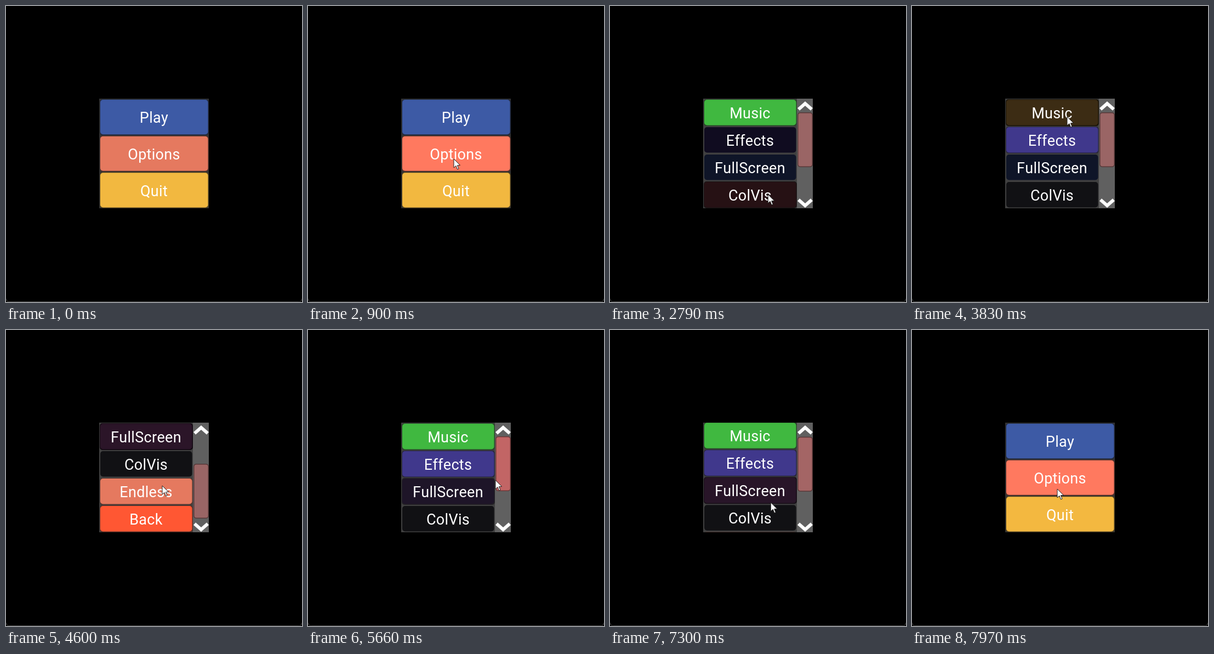
Animation, 540 px wide and 540 px high, one loop 7990 ms. Source, as an HTML page with a canvas:

```html
<!DOCTYPE html>
<html lang="en">
<head>
<meta charset="utf-8">
<title>Game menu</title>
<style>
  html, body { margin: 0; width: 100%; height: 100%; overflow: hidden; background: #000; }
  canvas { display: block; width: 540px; height: 540px; }
</style>
</head>
<body>
<canvas id="stage" width="540" height="540"></canvas>
<script>
const ctx = document.getElementById('stage').getContext('2d');
const LOOP = 7990, STEP = 10, FADE = 65;
const MOVE = 400, PRESS = 110, SCROLL = 60;
const PANEL = { x: 170, y: 169, size: 200 };
const LIST_WIDTH = 171, ROW = 50;

const rgb = hex => [1, 3, 5].map(i => parseInt(hex.slice(i, i + 2), 16));
const css = color => `rgb(${color.map(Math.round).join()})`;
const shade = (color, k) => css(color.map(v => v * k));
const warm = ([r, g, b], amount) => [Math.min(255, r + amount), g, b];
const mix = (a, b, k) => a + (b - a) * k;
const clamp = k => Math.max(0, Math.min(1, k));
const smooth = k => k * k * (3 - 2 * k);

const button = (label, color) => ({ label, color: rgb(color) });
const toggle = (label, off, on) => ({ label, color: rgb(off), onColor: on && rgb(on), toggle: true });

const mainMenu = [
  button('Play', '#3d5aa5'),
  button('Options', '#e5795f'),
  button('Quit', '#f2b840')
];
const optionsMenu = [
  toggle('Music', '#202c14', '#40b840'),
  toggle('Effects', '#100c20', '#40388c'),
  toggle('FullScreen', '#0f1528'),
  toggle('ColVis', '#111114'),
  button('Endless', '#e5795f'),
  button('Back', '#ff5733')
];
const thumb = { color: rgb('#9a6565') };
const widgets = [...mainMenu, ...optionsMenu, thumb];

// Places the pointer visits, with its arrival times.
const stops = [
  { at: 0, x: -20, y: 400 },
  { at: 760, x: 266, y: 279 },
  { at: 2250, x: 289, y: 374 },
  { at: 3060, x: 286, y: 254 },
  { at: 3480, x: 283, y: 202 },
  { at: 4440, x: 285, y: 284 },
  { at: 5660, x: 342, y: 274 },
  { at: 6350, x: 364, y: 262 },
  { at: 7440, x: 266, y: 335 },
  { at: 7900, x: 265, y: 290 }
];
const press = { options: 1080, effects: 3150, musicOff: 3560, musicOn: 3960, thumb: 6380, back: 7440 };
const presses = Object.values(press);

const released = (start, t) => t >= start + PRESS;
const inOptions = t => released(press.options, t) && !released(press.back, t);

function isOn(item, t) {
  if (item.label === 'Music') return !released(press.musicOff, t) || released(press.musicOn, t);
  return item.label === 'Effects' && released(press.effects, t);
}

function scrollAt(t) {
  const ramp = start => clamp((t - start) / SCROLL);
  return 2 * ROW * (ramp(4520) - ramp(5000) + ramp(7300));
}

function pointerAt(t) {
  const i = stops.findIndex(stop => stop.at > t);
  if (i < 0) return stops[stops.length - 1];
  const from = stops[i - 1], to = stops[i];
  const k = smooth(clamp(1 - (to.at - t) / Math.min(MOVE, to.at - from.at)));
  return { x: mix(from.x, to.x, k), y: mix(from.y, to.y, k) };
}

function widgetAt({ x, y }, t) {
  const left = x - PANEL.x, top = y - PANEL.y;
  if (Math.min(left, top) < 0 || Math.max(left, top) >= PANEL.size) return null;
  if (!inOptions(t)) return mainMenu[Math.floor(top * 3 / PANEL.size)];
  const scroll = scrollAt(t);
  if (left < LIST_WIDTH) return optionsMenu[Math.floor((top + scroll) / ROW)];
  return Math.abs(top - 75 - scroll / 2) < 50 ? thumb : null;
}

// Hover follows pointer movement only, so it is replayed from the loop's start.
function hoverAmounts(time) {
  const amounts = new Map(widgets.map(w => [w, 0]));
  const rate = 1 - Math.exp(-STEP / FADE);
  let hovered = null, last = pointerAt(0), wasOptions = false;
  for (let t = 0; t <= time; t += STEP) {
    const point = pointerAt(t), options = inOptions(t);
    if (options !== wasOptions) hovered = null;
    if (point.x !== last.x || point.y !== last.y) hovered = widgetAt(point, t);
    for (const w of widgets) amounts.set(w, mix(amounts.get(w), w === hovered ? 1 : 0, rate));
    last = point;
    wasOptions = options;
  }
  return amounts;
}

function box(x, y, w, h, r, fill) {
  ctx.fillStyle = fill;
  ctx.beginPath();
  ctx.roundRect(x, y, w, h, r);
  ctx.fill();
}

function drawButton(item, y, width, height, hover, on) {
  const color = warm(on ? item.onColor : item.color, 28 * hover);
  ctx.globalAlpha = item.toggle && !on ? hover : 0.6;
  box(PANEL.x + 1, y + 1, width - 1, height - 1, 5, shade(color, 0.4));
  ctx.globalAlpha = 1;
  box(PANEL.x + 2, y + 2, width - 3.5, height - 3.5, 5, css(color));
  ctx.fillStyle = '#fff';
  ctx.fillText(item.label, PANEL.x + width / 2, y + height / 2 + 11);
}

function drawChevron(y, dir) {
  ctx.strokeStyle = '#fff';
  ctx.lineWidth = 6;
  ctx.beginPath();
  ctx.moveTo(344, y + 5.5 * dir);
  ctx.lineTo(356, y - 5 * dir);
  ctx.lineTo(368, y + 5.5 * dir);
  ctx.stroke();
}

function drawScrollBar(scroll, hover) {
  const color = warm(thumb.color, 86 * hover);
  const y = PANEL.y + 25 + scroll / 2;
  ctx.fillStyle = '#606060';
  ctx.fillRect(PANEL.x + LIST_WIDTH, PANEL.y, PANEL.size - LIST_WIDTH, PANEL.size);
  box(342, y, 28, 100, 5, shade(color, 0.55));
  box(343.5, y + 1.5, 25, 97, 4, css(color));
  drawChevron(183, 1);
  drawChevron(359, -1);
}

function drawMenu(t, amounts) {
  const options = inOptions(t);
  const items = options ? optionsMenu : mainMenu;
  const height = options ? ROW : PANEL.size / 3;
  const width = options ? LIST_WIDTH : PANEL.size;
  const scroll = options ? scrollAt(t) : 0;
  ctx.save();
  ctx.beginPath();
  ctx.rect(PANEL.x, PANEL.y, PANEL.size, PANEL.size);
  ctx.clip();
  ctx.fillStyle = options ? '#404040' : '#333';
  ctx.fillRect(PANEL.x, PANEL.y, PANEL.size, PANEL.size);
  ctx.font = '27px Roboto, sans-serif';
  ctx.letterSpacing = '0.3px';
  ctx.fontKerning = 'none';
  ctx.textAlign = 'center';
  items.forEach((item, i) =>
    drawButton(item, PANEL.y + i * height - scroll, width, height, amounts.get(item), isOn(item, t)));
  if (options) drawScrollBar(scroll, amounts.get(thumb));
  ctx.restore();
}

function drawWindowEdge() {
  ctx.font = '15px Roboto, sans-serif';
  ctx.letterSpacing = '0px';
  ctx.textAlign = 'left';
  ctx.fillStyle = '#777';
  ctx.fillText('Build the menu and load the defaults', 24, 549.5);
  ctx.strokeStyle = '#4a4a4a';
  ctx.lineWidth = 1;
  ctx.beginPath();
  ctx.roundRect(0, -20, 540, 559.5, 6);
  ctx.save();
  ctx.clip();
  ctx.restore();
  ctx.beginPath();
  ctx.moveTo(0, 534);
  ctx.arcTo(0, 539.5, 6, 539.5, 5.5);
  ctx.arcTo(540, 539.5, 540, 534, 5.5);
  ctx.stroke();
}

function drawPointer(t) {
  const { x, y } = pointerAt(t);
  if (presses.some(start => t >= start && !released(start, t))) {
    ctx.fillStyle = 'rgba(245, 170, 48, .95)';
    ctx.beginPath();
    ctx.arc(x, y, 12, 0, Math.PI * 2);
    ctx.fill();
  }
  ctx.save();
  ctx.translate(x, y);
  const arrow = new Path2D('M0 0V16L4 12.5L6.5 19L9 18L6.4 11.8L11.5 11.5Z');
  ctx.fillStyle = '#fff';
  ctx.strokeStyle = '#222';
  ctx.lineWidth = 1;
  ctx.fill(arrow);
  ctx.stroke(arrow);
  ctx.restore();
}

function render() {
  const t = performance.now() % LOOP;
  ctx.fillStyle = '#000';
  ctx.fillRect(0, 0, 540, 540);
  drawWindowEdge();
  drawMenu(t, hoverAmounts(t));
  drawPointer(t);
  requestAnimationFrame(render);
}
render();
</script>
</body>
</html>
```
